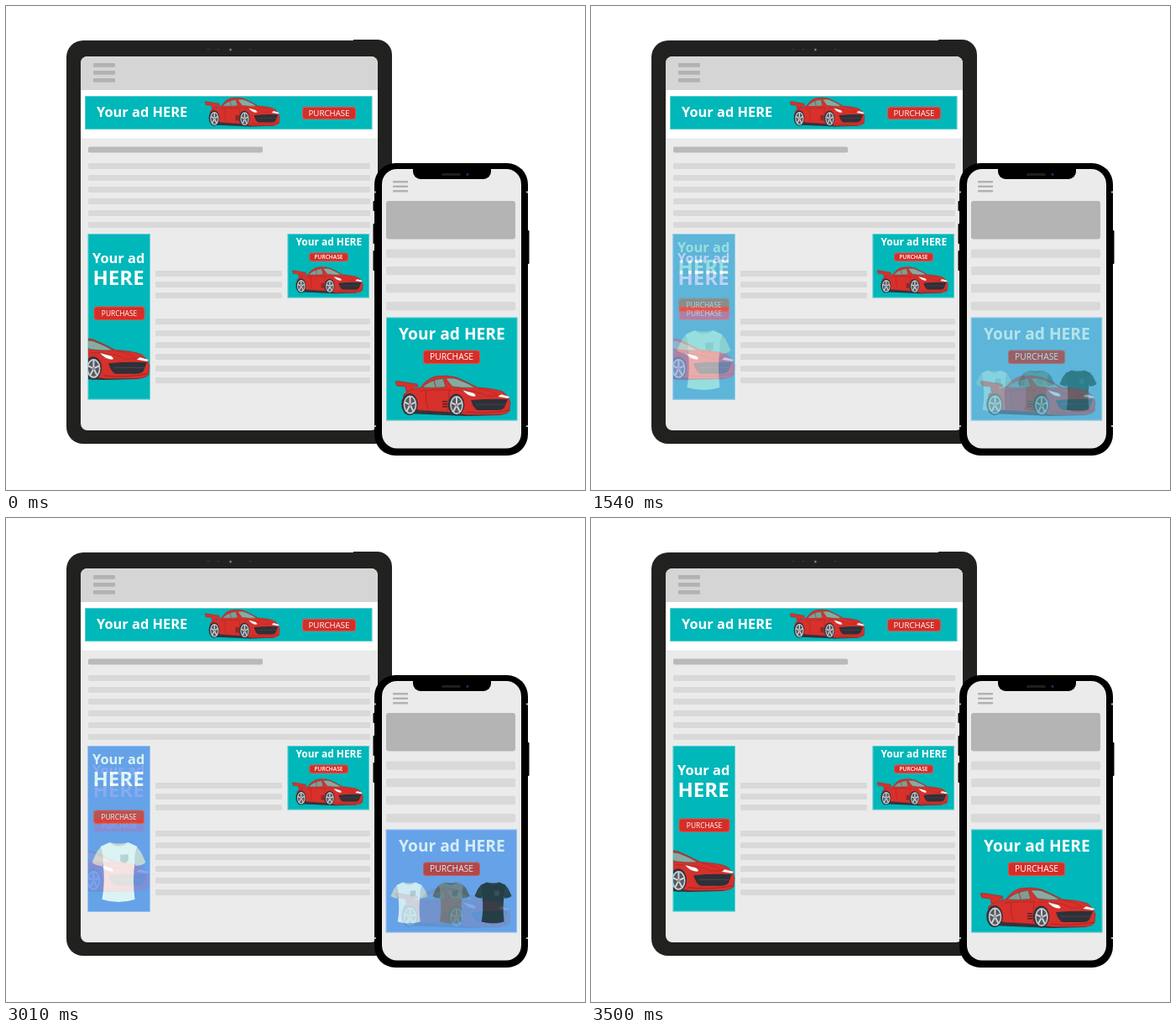
These frames come from a looping animation (690x576 px, 3710 ms). An HTML page with a canvas:

```html
<!DOCTYPE html>
<html lang="en">
<head>
<meta charset="utf-8">
<title>Responsive ads</title>
<style>
html, body { margin: 0; width: 100%; height: 100%; overflow: hidden; background: #fff; }
canvas { display: block; }
</style>
</head>
<body>
<canvas id="stage" width="690" height="576"></canvas>
<script>
const W = 690, H = 576, LOOP = 3710, STEP = 70, STEPS = 8;
const TO_SHIRTS = 1260, TO_CAR = 3010;
const TEAL = '#00b7b9', BLUE = '#6495f0', RED = '#d8302b', PAPER = '#ebebeb';
const FONT = '"Open Sans", "Noto Sans", sans-serif';

const view = document.getElementById('stage').getContext('2d');
const scratch = document.createElement('canvas');
scratch.width = W;
scratch.height = H;
const buffer = scratch.getContext('2d');
let c = view;

// Rectangles are given by their edges.
function box(x0, y0, x1, y1, color, r = 0) {
  c.fillStyle = color;
  c.beginPath();
  c.roundRect(x0, y0, x1 - x0, y1 - y0, r);
  c.fill();
}

function bars(x0, x1, tops, h, color, r = 1.5) {
  for (const y of tops) box(x0, y, x1, y + h, color, r);
}

function series(start, gap, n) {
  return Array.from({ length: n }, (_, i) => start + i * gap);
}

function dot(x, y, rx, ry, color) {
  c.fillStyle = color;
  c.beginPath();
  c.ellipse(x, y, rx, ry, 0, 0, Math.PI * 2);
  c.fill();
}

function shape(d, color, line, width = 0.6) {
  const p = new Path2D(d);
  if (color) { c.fillStyle = color; c.fill(p); }
  if (line) { c.strokeStyle = line; c.lineWidth = width; c.stroke(p); }
}

function label(s, x, y, size, weight = 700, align = 'left') {
  c.font = `${weight} ${size}px ${FONT}`;
  c.textAlign = align;
  c.fillStyle = '#fff';
  c.fillText(s, x, y);
}

function button(x0, y0, x1, y1, size, weight = 400) {
  box(x0, y0, x1, y1, '#e0504a', 3.5);
  box(x0 + 1, y0 + 1, x1 - 1, y1 - 1, '#d52e29', 3);
  label('PURCHASE', (x0 + x1) / 2, (y0 + y1) / 2 + size * 0.36, size, weight, 'center');
}

function panel(x0, y0, x1, y1, color) {
  box(x0, y0, x1, y1, color);
  c.strokeStyle = 'rgba(255,255,255,.35)';
  c.lineWidth = 1;
  c.strokeRect(x0 + 0.5, y0 + 0.5, x1 - x0 - 1, y1 - y0 - 1);
}

function wheel(x, y) {
  dot(x - 0.5, y, 9.8, 13, '#33333b');
  dot(x, y + 0.5, 7.8, 11, '#c9cdd0');
  dot(x, y + 0.5, 6.2, 9.2, '#55585f');
  c.strokeStyle = '#d4d7da';
  c.lineWidth = 1.9;
  c.beginPath();
  for (let i = 0; i < 5; i++) {
    const a = i * Math.PI * 0.4 - Math.PI / 2;
    c.moveTo(x, y + 0.5);
    c.lineTo(x + Math.cos(a) * 6.5, y + 0.5 + Math.sin(a) * 9.5);
  }
  c.stroke();
  dot(x, y + 0.5, 1.4, 1.9, '#8b8f94');
}

function car(x, y, sx, sy = sx) {
  c.save();
  c.translate(x, y);
  c.scale(sx, sy);
  shape('M9 30 L14 45 L84 48 L124 47 L134 42 L80 38Z', '#33333b');
  shape('M0 7 L4 6.5 L26 10 L27 13 L22 14 L20 19 H13 L12 13 L2 12Z', RED, '#97272a');
  shape('M10 22 Q19 15 30 14 Q38 3.5 47 1 Q61 -1.5 73 2 Q87 8 98 14 ' +
        'Q118 15 128 19 Q135 24 137 32 L136 42 Q132 46.5 122 46.5 ' +
        'L86 46.5 L62 43 L28 41 L9 33Z', RED, '#97272a');
  shape('M32 14 Q41 5 57 3 L60 13.5 Q45 15 32 14Z', '#7f9d95', '#5b3d3c');
  shape('M60 3.2 Q70 2 75 4.5 Q87 9 95 14.2 Q80 15 68 13Z', '#86aca2', '#5b3d3c');
  shape('M46 4.5 L48 14 M29 18 Q48 16 66 17 M37 18 Q35 32 40 40 M64 18 L62 42', null, '#a82523', 0.8);
  shape('M70 17 Q98 17 109 24 L132 24 M98 15 Q114 17 121 23', null, '#b42724', 0.8);
  shape('M80 17 L93 20.5 Q98 24 94 25 Q86 24.5 80 17Z', '#fff', '#8e3b39', 0.4);
  shape('M137 25 L126 22 L122 25 L134 27Z', '#fff', '#8e3b39', 0.4);
  shape('M90 29 Q112 27 134 28 L130 38 Q128 41 121 41 L98 41 Q93 39 90 29Z', '#2f3038');
  shape('M96 34 H131', null, '#4b4c54', 0.8);
  shape('M84 43 Q108 46 136 41', null, '#97272a', 0.9);
  bars(56, 62, [30, 33, 36], 1.6, '#42272c', 0.5);
  wheel(17.5, 34);
  wheel(73, 34.5);
  c.restore();
}

// Centred on x with the collar at y.
function shirt(x, y, s, body, sleeve, pocket) {
  c.save();
  c.translate(x, y);
  c.scale(s, s);
  shape('M-18 4 Q-25 7 -28 15 L-32 24 Q-27 28 -20 28 L-16 17Z', sleeve);
  shape('M18 4 Q25 7 28 15 L32 24 Q27 28 20 28 L16 17Z', sleeve);
  shape('M-11 0 Q0 7 11 0 L22 5 Q18 13 19 25 Q16 43 19 68 ' +
        'Q0 74 -20 68 Q-16 45 -19 25 Q-18 13 -22 5Z', body);
  shape('M-11 0 Q0 3 11 0 Q0 9 -11 0Z', sleeve);
  shape('M2 15 L11 14.5 V22 L7 24.5 L2 22.5Z', pocket, sleeve, 0.7);
  c.restore();
}

// Fades everything drawn by paint as one flat picture.
function fade(alpha, paint) {
  if (alpha <= 0) return;
  if (alpha >= 1) { paint(); return; }
  buffer.clearRect(0, 0, W, H);
  c = buffer;
  paint();
  c = view;
  c.globalAlpha = alpha;
  c.drawImage(scratch, 0, 0);
  c.globalAlpha = 1;
}

function tablet() {
  box(72, 41, 459, 521, '#21211f', 20);
  box(414, 40, 460, 200, '#21211f', [0, 18, 0, 0]);
  for (const x of [241, 253, 291]) dot(x, 51.5, 1.7, 1.7, '#2c2c2d');
  dot(267.5, 52, 2.2, 2.2, '#303337');
  dot(267.5, 52, 1, 1, '#9aa3ad');
  box(89, 60, 443, 505, PAPER, 8);
  box(89, 60, 443, 100, '#d5d5d5', [8, 8, 0, 0]);
  box(89, 100, 443, 157.5, '#fff');
  bars(104, 130, [68, 77, 86], 4.7, '#b2b2b2', 0.5);

  panel(94, 107, 436.5, 147, TEAL);
  label('Your ad HERE', 108, 131.5, 16.4);
  car(237, 109, 0.65, 0.72);
  button(353, 120, 417, 135, 9.7);

  bars(98, 306, [167.5], 7, '#bababa');
  bars(98, 434, series(187, 14, 6), 7, '#d9d9d9');
  bars(178, 329, series(315, 13, 3), 7, '#d9d9d9');
  bars(178, 434, series(372, 14, 6), 7, '#d9d9d9');

  panel(335.5, 271, 433, 347.5, TEAL);
  label('Your ad HERE', 345.5, 285, 11.9);
  button(361, 293.5, 408, 304, 6.6, 600);
  car(341, 310.5, 0.615, 0.66);
}

function phone() {
  box(437.5, 232, 441, 244, '#000', 1);
  box(437.5, 259, 441, 283, '#000', 1);
  box(437.5, 291, 441, 315, '#000', 1);
  box(620, 267, 623.5, 307, '#000', 1);
  box(439, 187, 622, 535, '#000', 25);
  for (const y of [220.5, 499]) {
    box(439, y, 441, y + 2, '#b5b5b5');
    box(620, y, 622, y + 2, '#b5b5b5');
  }
  box(448, 194, 614, 526.5, PAPER, 18);
  box(485, 192, 578, 206, '#000', [0, 0, 9, 9]);
  box(519, 199, 542, 202, '#1f1f1f', 1.5);
  dot(550, 200.5, 1.4, 1.4, '#2c2d66');
  bars(461, 479, [208, 213.5, 219], 2.6, '#b2b2b2', 0.5);
  box(453, 232, 607, 277.5, '#b4b4b4', 3);
  bars(453, 607, [289.5, 310, 331, 352], 10.3, '#d9d9d9');
}

function tallShirts() {
  panel(97, 271, 172, 469, BLUE);
  label('Your ad', 103, 293, 16.4);
  label('HERE', 103.5, 319, 24);
  button(104, 347.5, 165, 364, 8.4);
  shirt(134.5, 386, 1, '#fff', '#d9d9d9', '#d5d5d7');
}

function tallCar() {
  panel(97.5, 271, 172, 468.5, TEAL);
  label('Your ad', 103, 306, 16.4);
  label('HERE', 103.5, 332, 24);
  button(104.5, 357.5, 165.5, 374, 8.4);
  c.save();
  c.beginPath();
  c.rect(98, 271, 74, 197);
  c.clip();
  car(28.5, 395, 1.04);
  c.restore();
}

const wideText = () => label('Your ad HERE', 468, 397, 19.2);
const wideButton = () => button(497, 409.5, 565, 426, 10.3);

const wideShirts = [
  () => panel(452.5, 370.5, 609, 493.5, BLUE),
  wideText,
  wideButton,
  () => {
    shirt(480.5, 433.5, 0.69, '#fff', '#d9d9d9', '#d5d5d7');
    shirt(530.5, 433.5, 0.69, '#7b7b7c', '#59595a', '#5d5d60');
    shirt(580.5, 433.5, 0.69, '#1f1f1f', '#282828', '#37373a');
  }
];

const wideCar = [
  () => panel(453, 370.5, 609.5, 493.5, TEAL),
  wideText,
  wideButton,
  () => car(464, 440, 1)
];

function stepsSince(t, start) {
  return Math.max(0, Math.min(STEPS, Math.floor((t - start) / STEP) + 1));
}

function draw(t) {
  const mix = (stepsSince(t, TO_SHIRTS) - stepsSince(t, TO_CAR)) / STEPS;
  box(0, 0, W, H, '#fff');
  tablet();
  fade(mix, tallShirts);
  fade(1 - mix, tallCar);
  phone();
  // The phone's parts fade one by one, the tall ad as a whole.
  for (const part of wideShirts) fade(mix, part);
  for (const part of wideCar) fade(1 - mix, part);
}

const begin = performance.now();
function tick() {
  draw((performance.now() - begin) % LOOP);
  requestAnimationFrame(tick);
}
tick();
</script>
</body>
</html>
```
